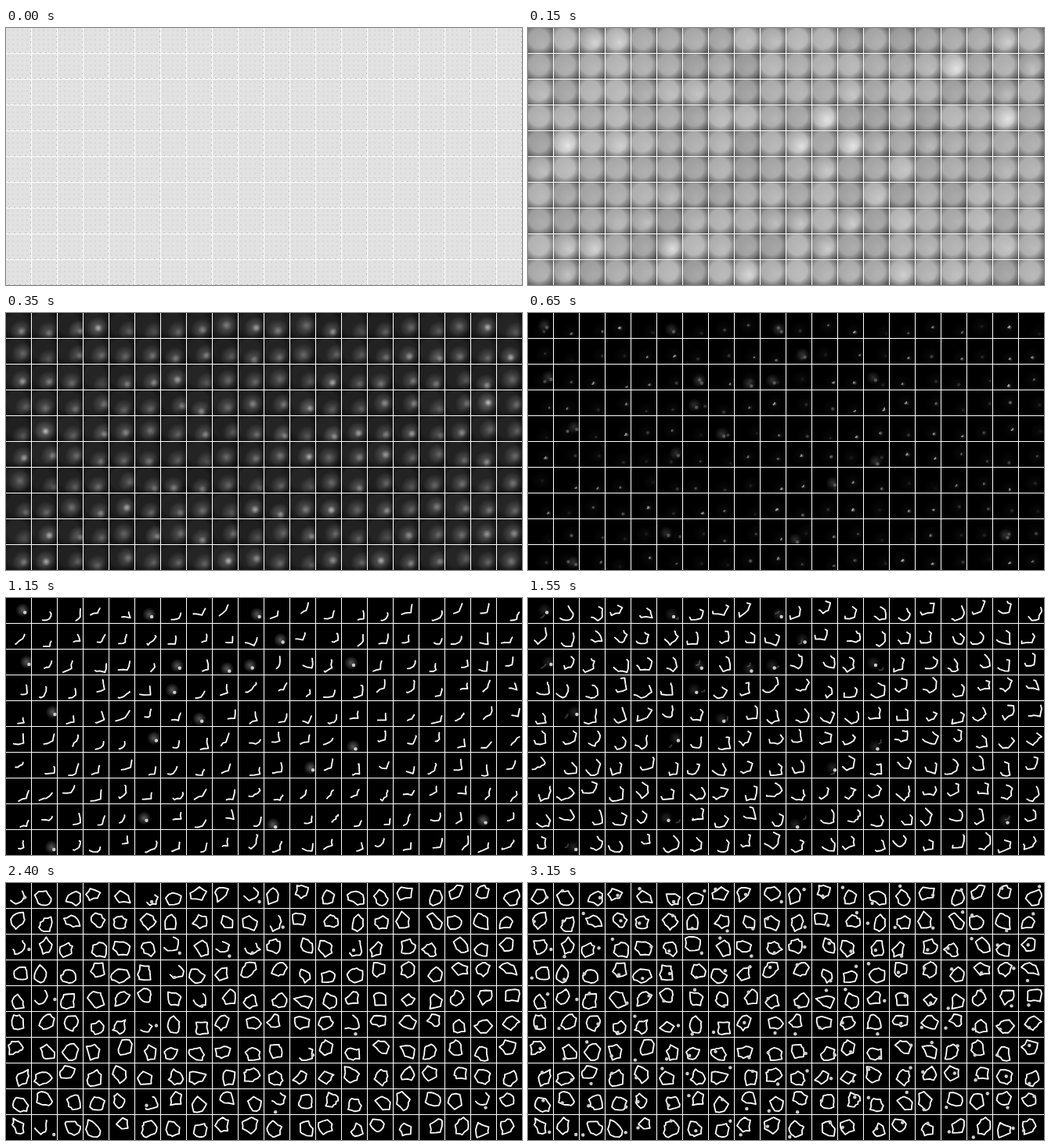
An HTML page with a canvas that plays this animation: 659 by 329 pixels, repeating every 6.15 s.

```html
<!DOCTYPE html>
<html lang="en">
<head>
<meta charset="utf-8">
<title>Grid of drawn loops</title>
<style>
  html, body { margin: 0; width: 100%; height: 100%; overflow: hidden; background: #000; }
  canvas { display: block; }
</style>
</head>
<body>
<canvas width="659" height="329"></canvas>
<script>
const ctx = document.querySelector('canvas').getContext('2d');
const COLS = 20, ROWS = 10, PITCH = 33, SIZE = 32;
const LOOP = 6150, LAST = 3150, STEP = 50;

let seed = 71;
function rand(a = 0, b = 1) {
  seed = (seed * 16807) % 2147483647;
  return a + (b - a) * seed / 2147483647;
}
const clamp = (v, a = 0, b = 1) => Math.min(b, Math.max(a, v));
const mix = (a, b, f) => a + (b - a) * f;
const phase = (t, from, to) => clamp((t - from) / (to - from));

// A rough polygon, stretched along a random axis, first corner at lower right
function makeOutline() {
  const cx = rand(11, 21), cy = rand(11, 21);
  const corners = Math.floor(rand(5, 8));
  const turn = rand(0.5, 1), axis = rand(0, Math.PI), stretch = rand(0, 0.22);
  const points = [];
  for (let i = 0; i < corners; i++) {
    const a = turn + (i + (i && rand(-0.3, 0.3))) * 2 * Math.PI / corners;
    const r = rand(7.2, 11.8) * (1 + stretch * Math.cos(2 * (a - axis)));
    points.push([clamp(cx + r * Math.cos(a), 3, 29), clamp(cy + r * Math.sin(a), 3, 29)]);
  }
  return points.flatMap((p, i) => {
    const q = points[(i + 1) % corners];
    return [p, p.map((v, k) => mix(v, q[k], 0.5) + rand(-1.3, 1.3))];
  });
}

// In a few cells the dot comes before the outline
function makeCell(index) {
  const early = rand() < 0.085;
  return {
    x: index % COLS * PITCH, y: Math.floor(index / COLS) * PITCH,
    outline: makeOutline(), early,
    dot: early ? [rand(14, 30), rand(17, 30)] : [rand(4, 28), rand(4, 29)],
    dotStart: early ? 600 : rand(2450, 2980),
    lineStart: early ? 1350 : rand(560, 680),
    glow: rand() ** 2, shade: rand(-16, 16)
  };
}
const cells = Array.from({ length: COLS * ROWS }, (_, i) => makeCell(i));

function radial(x, y, r, inner, outer, hold = 0) {
  const g = ctx.createRadialGradient(x, y, 0, x, y, r);
  g.addColorStop(hold, inner);
  g.addColorStop(1, outer);
  ctx.fillStyle = g;
  ctx.fillRect(0, 0, SIZE, SIZE);
}
const glowAt = (x, y, r, a) => radial(x, y, r, `rgba(255,255,255,${a})`, 'rgba(255,255,255,0)');

// The grey field darkens while its light gathers near the lower right
function drawHaze(cell, t) {
  const [sx, sy] = cell.outline[0];
  const gather = phase(t, 100, 400), fade = 1 - phase(t, 400, 700);
  const level = 226 / (1 + (t / 210) ** 3) * (1 - phase(t, 300, 650));
  const v = Math.round(level + cell.shade * phase(t, 0, 150) * (1 - gather));
  ctx.fillStyle = `rgb(${v},${v},${v})`;
  ctx.fillRect(0, 0, SIZE, SIZE);
  const bright = 0.12 + 0.75 * cell.glow ** 4;
  glowAt(mix(18, sx, gather), mix(18, sy, gather), mix(20, 13, gather),
    mix(bright, 0.26, gather) * phase(t, 0, 150) * fade);
  glowAt(sx + 1, sy, mix(7 - 2 * cell.glow, 3, phase(t, 350, 650)),
    (0.12 + 0.6 * cell.glow) * gather * (1 - phase(t, 600, 750)));
  radial(14, 14, 25, 'rgba(0,0,0,0)', `rgba(0,0,0,${0.75 * phase(t, 0, 200)})`, 0.5);
}

function drawTexture(fade) {
  ctx.fillStyle = `rgba(120,120,120,${0.1 * fade})`;
  for (let y = 2; y < SIZE; y += 6)
    for (let x = 2; x < SIZE; x += 6) ctx.fillRect(x, y, 2, 2);
  ctx.fillStyle = `rgba(90,90,90,${0.3 * fade})`;
  for (let p = 3; p < SIZE; p += 7) {
    ctx.fillRect(p, 31, 2, 1);
    ctx.fillRect(31, p, 1, 2);
  }
}

// The outline grows both ways from its lower right corner
function drawLine(cell, t) {
  const age = t - cell.lineStart;
  const part = clamp(age * (cell.early ? 0.00057 : 0.0006));
  if (!part) return;
  const n = cell.outline.length, reach = part * n / 2;
  const at = u => {
    const i = Math.floor(u), q = cell.outline[(i + 1 + n) % n];
    return cell.outline[(i + n) % n].map((v, k) => mix(v, q[k], u - i));
  };
  ctx.globalAlpha = clamp(age / (cell.early ? 900 : 150));
  ctx.beginPath();
  ctx.moveTo(...at(-reach));
  for (let u = Math.ceil(-reach); u < reach; u++) ctx.lineTo(...at(u));
  ctx.lineTo(...at(reach));
  if (part === 1) ctx.closePath();
  ctx.stroke();
  ctx.globalAlpha = 1;
}

function drawDot(cell, t) {
  const alpha = phase(t, cell.dotStart, cell.dotStart + 150);
  if (!alpha) return;
  ctx.fillStyle = `rgba(205,205,205,${alpha})`;
  ctx.beginPath();
  ctx.arc(...cell.dot, 2.2, 0, 2 * Math.PI);
  ctx.fill();
}

function draw(t) {
  ctx.fillStyle = '#fff';
  ctx.fillRect(0, 0, 659, 329);
  ctx.strokeStyle = '#fff';
  ctx.lineWidth = 1.8;
  ctx.lineCap = ctx.lineJoin = 'round';
  for (const cell of cells) {
    ctx.save();
    ctx.translate(cell.x, cell.y);
    ctx.beginPath();
    ctx.rect(0, 0, SIZE, SIZE);
    ctx.clip();
    drawHaze(cell, t);
    if (t < 150) drawTexture(1 - t / 150);
    if (cell.early) {
      const [x, y] = cell.dot;
      glowAt(x - 3, y - 3, 9, 0.35 * phase(t, 500, 800) * (1 - phase(t, 1200, 1800)));
    }
    drawLine(cell, t);
    drawDot(cell, t);
    ctx.restore();
  }
}

const begin = performance.now();
let shown = -1;
function tick() {
  const time = (performance.now() - begin) % LOOP;
  const t = Math.min(LAST, Math.floor(time / STEP) * STEP);
  if (t !== shown) draw(shown = t);
  requestAnimationFrame(tick);
}
tick();
</script>
</body>
</html>
```
